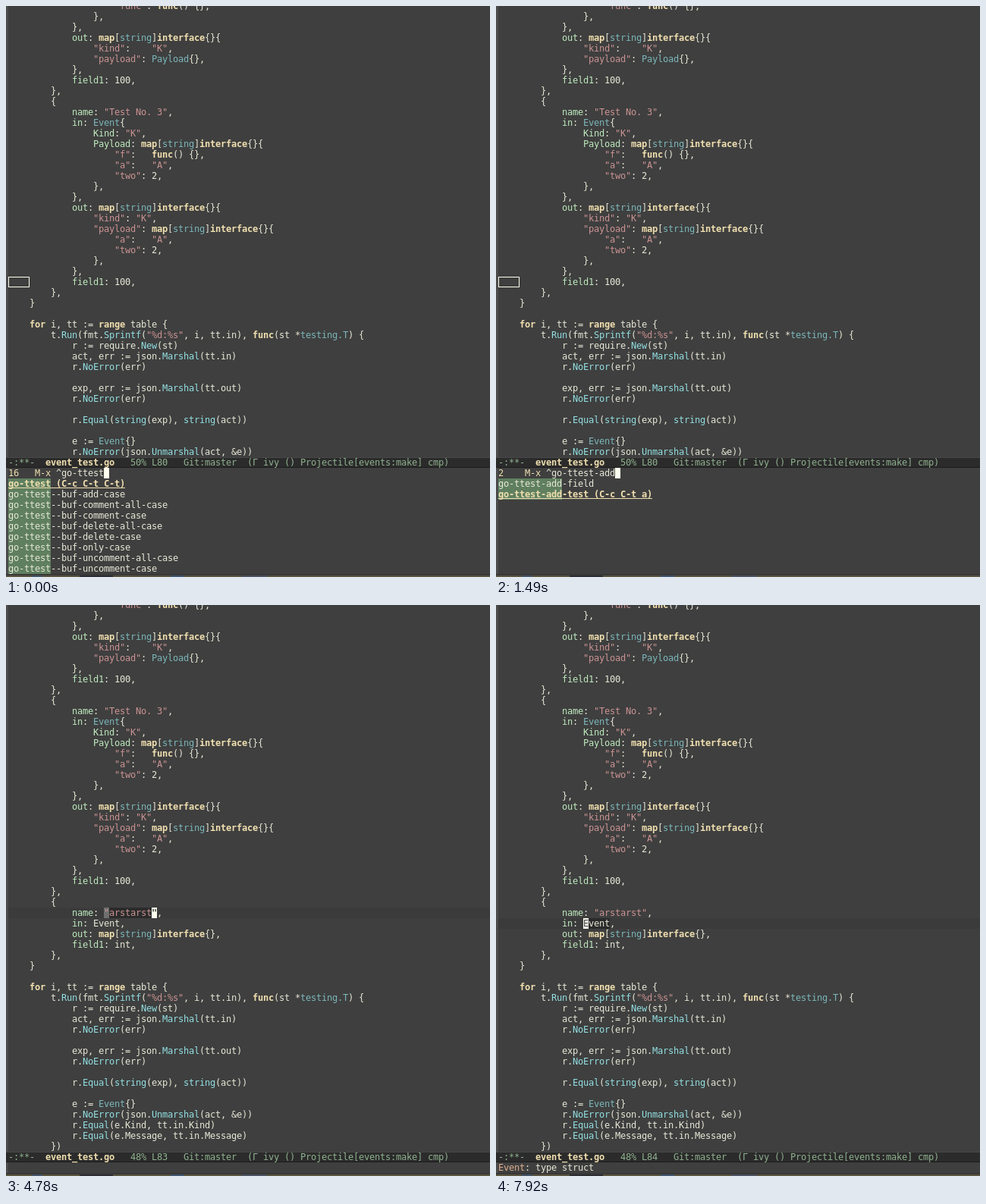
Animation of 638x753 px, one loop 8000 ms. Source, as an HTML page with a canvas:

```html
<!DOCTYPE html>
<html lang="en">
<head>
<meta charset="utf-8">
<title>Editor session</title>
<style>
html, body { margin: 0; width: 100%; height: 100%; overflow: hidden; background: #3f3f3f; }
canvas { display: block; }
</style>
</head>
<body>
<canvas id="stage" width="638" height="753"></canvas>
<script>
const W = 638, H = 753, CELL = 7, LINE = 14, LEFT = 3, LOOP = 8000;
const canvas = document.getElementById('stage');
const ctx = canvas.getContext('2d');
const dpr = window.devicePixelRatio || 1;
canvas.width = W * dpr;
canvas.height = H * dpr;
canvas.style.width = W + 'px';
canvas.style.height = H + 'px';
ctx.scale(dpr, dpr);

const FONT = '12px "DejaVu Sans Mono", monospace';
const C = {
  bg: '#3f3f3f', fg: '#e8e8d8', cursor: '#ffffef', fringe: '#4c4c4c',
  keyword: '#f0dfaf', string: '#cc9393', type: '#7cb8bb', func: '#93e0e3',
  label: '#bfebbf', mode: '#8fb28f', modeBg: '#2b2b2b', line: '#3b3b3b',
  symbol: '#2b2b2b', paren: '#6f6f6f', match: '#5f7f5f', doc: '#dfaf8f'
};

// Each entry is "indent|code".
const head = `20|"func": func() {},
16|},
12|},
12|out: map[string]interface{}{
16|"kind":    "K",
16|"payload": Payload{},
12|},
12|field1: 100,
8|},
8|{
12|name: "Test No. 3",
12|in: Event{
16|Kind: "K",
16|Payload: map[string]interface{}{
20|"f":   func() {},
20|"a":   "A",
20|"two": 2,
16|},
12|},
12|out: map[string]interface{}{
16|"kind": "K",
16|"payload": map[string]interface{}{
20|"a":   "A",
20|"two": 2,
16|},
12|},
12|field1: 100,
8|},`.split('\n');

const tail = `4|}
0|
4|for i, tt := range table {
8|t.Run(fmt.Sprintf("%d:%s", i, tt.in), func(st *testing.T) {
12|r := require.New(st)
12|act, err := json.Marshal(tt.in)
12|r.NoError(err)
0|
12|exp, err := json.Marshal(tt.out)
12|r.NoError(err)
0|
12|r.Equal(string(exp), string(act))
0|
12|e := Event{}
12|r.NoError(json.Unmarshal(act, &e))
12|r.Equal(e.Kind, tt.in.Kind)
12|r.Equal(e.Message, tt.in.Message)
8|})`.split('\n');

const newCase = value => ['8|{', `12|name: ${value},`, '12|in: Event,',
  '12|out: map[string]interface{},', '12|field1: int,', '8|},'];

const rules = [
  ['string', /"[^"]*"/y],
  ['keyword', /\b(?:func|map|interface|for|range)\b/y],
  ['type', /\b(?:(?:Event|Payload)(?=\{)|testing\.T|string(?=\]))/y],
  ['func', /\b\w+(?=\()/y],
  ['label', /^\w+(?=:)/y],
  ['fg', /\w+|[^\w]/y]
];

const rowTop = row => row * LINE - 7;
const colX = col => LEFT + col * CELL;

function rect(x, y, w, h, color) {
  ctx.fillStyle = color;
  ctx.fillRect(x, y, w, h);
}

function cells(col, top, count, color) {
  rect(colX(col), top, count * CELL, LINE, color);
}

// Writes on the character grid and returns the next column.
function write(text, col, top, color, bold) {
  ctx.font = (bold ? 'bold ' : '') + FONT;
  ctx.fillStyle = color;
  for (const ch of text) {
    if (ch !== ' ') ctx.fillText(ch, colX(col), top + 11);
    col++;
  }
  return col;
}

function writeCode(entry, row) {
  const cut = entry.indexOf('|');
  const code = entry.slice(cut + 1);
  let col = +entry.slice(0, cut), at = 0;
  while (at < code.length) {
    for (const [kind, re] of rules) {
      re.lastIndex = at;
      const hit = re.exec(code);
      if (!hit) continue;
      col = write(hit[0], col, rowTop(row), C[kind], kind === 'keyword');
      at = re.lastIndex;
      break;
    }
  }
}

function cursor(col, top, ch, bold) {
  cells(col, top, 1, C.cursor);
  if (ch) write(ch, col, top, C.bg, bold);
}

function modeLine(top, place) {
  rect(0, top, W, LINE, C.modeBg);
  rect(0, top, W, 1, '#474747');
  rect(0, top + LINE - 1, W, 1, '#1d1d1d');
  write('-:**-', 0, top, C.mode);
  write('event_test.go', 7, top, C.keyword, true);
  write(place + '   Git:master  (Γ ivy () Projectile[events:make] cmp)', 23, top, C.mode);
}

function bottomEdge() {
  rect(0, 749, W, 2, '#383838');
  rect(0, 751, W, 2, '#5c553f');
  rect(34, 751, 14, 2, '#46566a');
  rect(97, 751, 44, 2, '#2d2f33');
  rect(217, 751, 18, 2, '#40566f');
  rect(310, 751, 34, 2, '#4b5360');
}

const bufCases = ['add', 'comment-all', 'comment', 'delete-all', 'delete',
  'only', 'uncomment-all', 'uncomment'].map(s => `go-ttest--buf-${s}-case`);
const addCases = ['go-ttest-add-field', 'go-ttest-add-test (C-c C-t a)'];

function candidate(text, top, matched, current) {
  cells(0, top, matched, C.match);
  if (current) {
    write(text, 0, top, C.keyword, true);
    rect(LEFT, top + 12, text.length * CELL, 1, C.keyword);
    return;
  }
  const [name, key] = text.split(/[()]/);
  let col = write(name, 0, top, C.fg);
  if (key) {
    col = write('(', col, top, C.fg);
    col = write(key, col, top, C.keyword, true);
    write(')', col, top, C.fg);
  }
}

function drawPrompt({ typed, count, list, pick = 0 }) {
  head.concat(tail.slice(0, 15)).forEach(writeCode);
  ctx.strokeStyle = C.cursor;
  ctx.lineWidth = 1;
  ctx.strokeRect(LEFT + .5, 357.5, 27, 13);
  modeLine(595, '50% L80');
  write(String(count), 0, 609, C.keyword);
  write('M-x', 5, 609, C.keyword);
  cursor(write('^' + typed, 9, 609, C.fg), 609);
  list.forEach((text, i) => candidate(text, 623 + i * LINE, typed.length, i === pick));
}

function drawEdit({ value, on, paren, second, doc }) {
  const top = rowTop(second ? 30 : 29);
  const quoted = value[0] === '"';
  const last = 18 + value.length - 1;
  rect(LEFT, top, W - LEFT, LINE, C.line);

  if (second) cells(16, top, 5, C.symbol);
  else if (quoted) cells(19, top, value.length - 2, C.symbol);
  else cells(18, top, value.length, C.symbol);
  if (paren) {
    cells(18, rowTop(29), 1, C.paren);
    cells(last, rowTop(29), 1, C.paren);
  }

  head.concat(newCase(value), tail).forEach(writeCode);
  if (on) {
    if (second) cursor(16, top, 'E');
    else if (quoted) cursor(last, top, '"', paren);
    else cursor(18, top, value[0]);
  }
  modeLine(721, second ? '48% L84' : '48% L83');
  if (doc) write(': type struct', write('Event', 0, 735, C.doc), 735, C.fg);
}

const ask = (typed, count, list, pick) => () => drawPrompt({ typed, count, list, pick });
const edit = (value, on, more) => () => drawEdit({ value, on, ...more });
const done = '"arstarst"';
const onEvent = (on, more = { doc: true }) => edit(done, on, { second: true, ...more });
const inQuotes = (text, paren = true) => edit(`"${text}"`, true, { paren });

const steps = [
  [0, ask('go-ttest', 16, ['go-ttest (C-c C-t C-t)', ...bufCases])],
  [300, ask('go-ttest-', 15, [...bufCases, addCases[0]])],
  [440, ask('go-ttest-a', 2, addCases)],
  [1040, ask('go-ttest-ad', 2, addCases)],
  [1190, ask('go-ttest-add', 2, addCases)],
  [1490, ask('go-ttest-add', 2, addCases, 1)],
  [1940, edit('string', true)],
  [2390, edit('string', false)],
  [2990, edit('string', true)],
  [3440, edit('string', false)],
  [3730, inQuotes('', false)],
  [3880, inQuotes('')],
  [4330, inQuotes('ar')],
  [4480, inQuotes('arst')],
  [4630, inQuotes('arstar')],
  [4780, inQuotes('arstarst')],
  [4930, onEvent(true, { paren: true })],
  [5080, onEvent(true, {})],
  [5530, onEvent(false)],
  [5980, onEvent(true)],
  [6430, onEvent(false)],
  [7030, onEvent(true)],
  [7480, onEvent(false)],
  [7920, onEvent(true)]
];

let shown = null;
const start = performance.now();

function frame() {
  const t = (performance.now() - start) % LOOP;
  const step = steps.findLast(([at]) => at <= t);
  if (step !== shown) {
    shown = step;
    rect(0, 0, W, H, C.bg);
    rect(0, 0, LEFT, 749, C.fringe);
    step[1]();
    bottomEdge();
  }
  requestAnimationFrame(frame);
}
frame();
</script>
</body>
</html>
```
